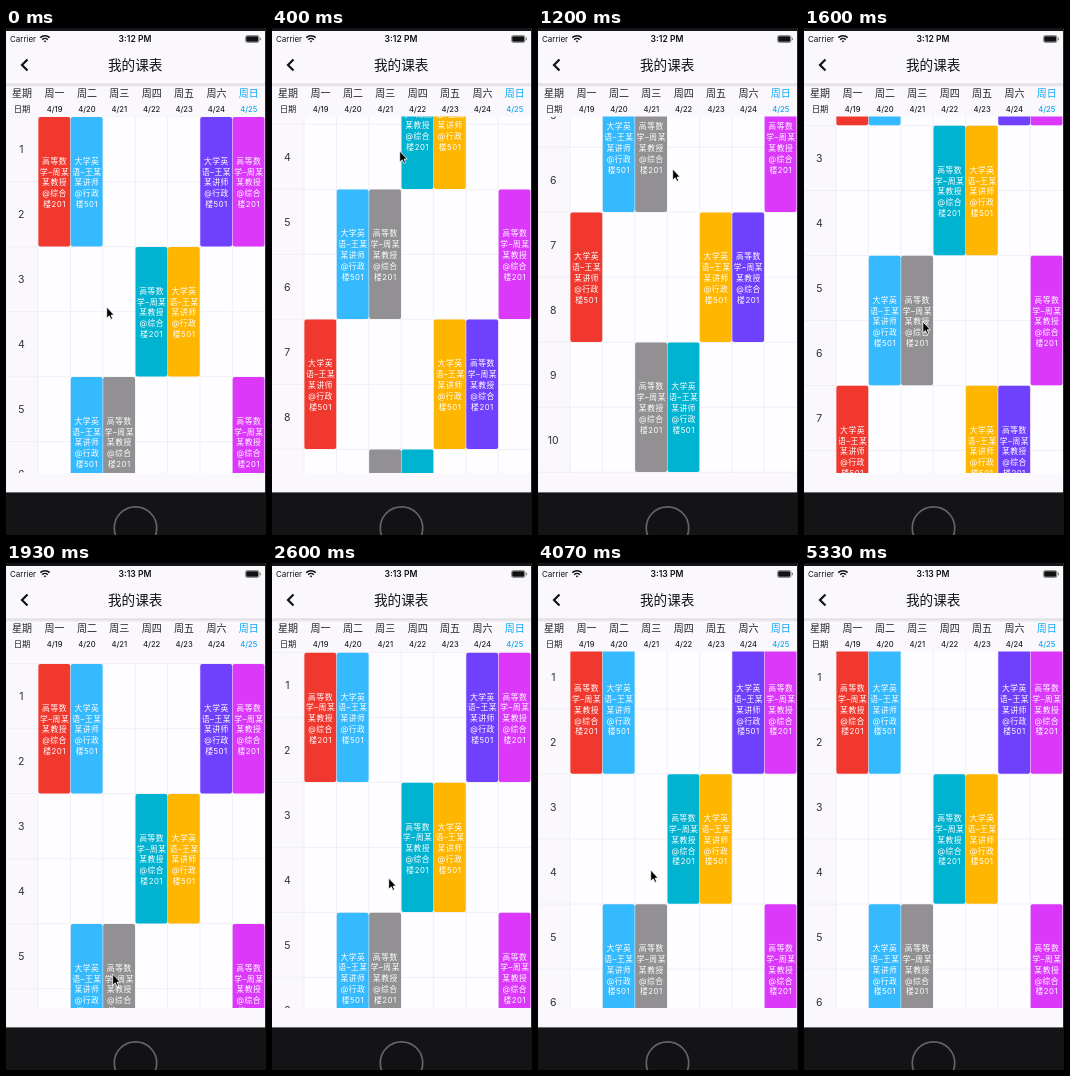
These frames come from a looping animation (260x507 px, 5390 ms). An HTML page:

```html
<!DOCTYPE html>
<html lang="zh">
<head>
<meta charset="utf-8">
<style>
html, body { margin: 0; width: 100%; height: 100%; overflow: hidden; background: #faf8fc; }
svg { display: block; width: 260px; height: 507px; font-family: Inter, "Noto Sans CJK SC", "Noto Sans CJK", sans-serif; }
</style>
</head>
<body>
<svg viewBox="0 0 260 507">
  <defs>
    <clipPath id="view"><rect y="88.5" width="259" height="356.5"/></clipPath>
    <linearGradient id="shade" x2="0" y2="1">
      <stop stop-color="#d9d7dc"/><stop offset="1" stop-color="#faf8fc"/>
    </linearGradient>
  </defs>
  <rect width="260" height="507" fill="#faf8fc"/>
  <g clip-path="url(#view)"><g id="grid"></g></g>
  <g id="head">
    <rect y="55.5" width="259" height="4" fill="url(#shade)"/>
    <path d="M21.5 31.5L16 37l5.5 5.5" fill="none" stroke="#111" stroke-width="2.2"/>
    <g fill="none" stroke="#111" stroke-width="1.5">
      <path d="M34.3 9.6a6.6 6.6 0 0 1 9.4 0M36.2 11.7a4 4 0 0 1 5.6 0"/>
      <path d="M39 14.6l-1.3-1.5a2 2 0 0 1 2.6 0z" fill="#111" stroke="none"/>
    </g>
    <rect x="239.5" y="7.5" width="13.5" height="7" rx="1.8" fill="none" stroke="#666" stroke-width=".7"/>
    <rect x="240.2" y="8.2" width="12.1" height="5.6" rx="1.2" fill="#111"/>
    <path d="M254.4 9.8v2.4" stroke="#777"/>
  </g>
  <rect width="260" height="3" fill="#16151a"/>
  <rect x="259" width="1" height="507" fill="#29282c"/>
  <rect y="464.4" width="260" height="43" fill="#141416"/>
  <circle cx="129.5" cy="500" r="21.2" fill="#121214" stroke="#656568" stroke-width="1.7"/>
  <path id="cursor" d="M0 0V11.2L2.6 8.8L4.2 12.4L5.9 11.7L4.4 8.1H7.5Z" fill="#000" stroke="#fff" stroke-width=".8"/>
</svg>
<script>
const $ = id => document.getElementById(id);
const grid = $('grid'), head = $('head'), cursor = $('cursor');
const TOP = 89, ROW = 65, COL = 259 / 8;
const LOOP = 5390, FRAMES = 81;

function add(parent, tag, attrs, content = '') {
  const el = document.createElementNS('http://www.w3.org/2000/svg', tag);
  for (const k in attrs) el.setAttribute(k, attrs[k]);
  el.textContent = content;
  return parent.appendChild(el);
}

// Text centred on (x, y)
const label = (parent, str, x, y, size, fill = '#222', more = {}) =>
  add(parent, 'text', { x, y: y + size * 0.37, 'font-size': size, fill, 'text-anchor': 'middle', ...more }, str);

// Header
label(head, 'Carrier', 17, 11, 8, '#111');
const clock = label(head, '', 129, 11, 8.6, '#111', { 'font-weight': 600 });
label(head, '我的课表', 129.2, 37, 13.6, '#111', { 'font-weight': 500 });
label(head, '星期', 16, 65, 10);
label(head, '日期', 16, 81, 8.4);
[...'一二三四五六日'].forEach((day, i) => {
  const x = COL * (i + 1.5), fill = i == 6 ? '#0ca6f5' : '#222';
  label(head, '周' + day, x, 65, 10, fill);
  label(head, '4/' + (19 + i), x, 80.8, 7.6, fill, { 'font-weight': 500 });
});

// Timetable
add(grid, 'rect', { x: COL, y: TOP, width: COL * 7, height: ROW * 10, fill: '#fefdff' });
let lines = '';
for (let r = 0; r <= 10; r++) lines += `M0 ${TOP + r * ROW - 0.3}H259`;
for (let c = 1; c < 8; c++) lines += `M${c * COL - 0.3} ${TOP}v${ROW * 10}`;
add(grid, 'path', { d: lines, stroke: '#eeecf1', 'stroke-width': 0.8 });
for (let r = 0; r < 10; r++) label(grid, r + 1, 15.3, TOP + ROW * (r + 0.5), 10.5, '#333');

// One string per pair of rows: the letter is the colour, upper case is maths, lower case English
const PLAN = ['Rb...vP', '...Ca..', '.bG...P', 'r...aV.', '..Gc...'];
const COLORS = { r: '#f0382e', b: '#35b9ff', g: '#929092', c: '#00b3d0', a: '#ffb600', v: '#7040ff', p: '#db38fb' };
const MATH = ['高等数', '学–周某', '某教授', '@综合', '楼201'];
const ENGLISH = ['大学英', '语–王某', '某讲师', '@行政', '楼501'];
PLAN.forEach((week, row) => [...week].forEach((key, day) => {
  if (key == '.') return;
  const color = key.toLowerCase(), x = COL * (day + 1), y = TOP + row * 2 * ROW;
  add(grid, 'rect', { x, y, width: COL - 0.5, height: ROW * 2 - 0.6, rx: 2, fill: COLORS[color] });
  (key == color ? ENGLISH : MATH).forEach((s, i) =>
    label(grid, s, x + COL / 2, y + ROW + 0.6 + (i - 2) * 10.8, 7.8, '#fff', { 'letter-spacing': 0.5 }));
}));

// Motion: each move adds its distance between two times
const smooth = u => u * u * (3 - 2 * u);
const fling = u => 1 - (1 - u) ** 2.5;
const progress = (t, from, to, ease = smooth) =>
  ease(Math.min(1, Math.max(0, (t - from) / (to - from))));

const scrolls = [
  [0, 1200, 294.5, fling], [1200, 1930, -306.5], [1930, 2600, 11.3, fling],
  [2600, 3270, -0.3], [3600, 4070, 8.7]
];
const strokes = [
  [0, 330, 27, -156], [730, 1200, 7, 18], [1200, 1930, -28, 270], [2070, 2500, 10, -96],
  [2700, 3200, -4, 0], [3600, 4070, 0, -8], [4270, 4400, -9, -38], [4530, 4730, -14, -183]
];

function draw(now) {
  const frame = Math.floor(now % LOOP / LOOP * FRAMES + 0.1) % FRAMES;
  const t = frame * LOOP / FRAMES;
  let offset = 0, x = 100.7, y = 279;
  for (const [from, to, d, ease] of scrolls) offset += d * progress(t, from, to, ease);
  for (const [from, to, dx, dy] of strokes) {
    const p = progress(t, from, to);
    x += dx * p;
    y += dy * p;
  }
  grid.setAttribute('transform', `translate(0 ${-offset})`);
  cursor.setAttribute('transform', `translate(${x} ${y})`);
  cursor.setAttribute('visibility', t < 4780 ? 'visible' : 'hidden');
  clock.textContent = t < 1850 ? '3:12 PM' : '3:13 PM';
}

let start;
function tick(now) {
  start ??= now;
  draw(now - start);
  requestAnimationFrame(tick);
}
draw(0);
requestAnimationFrame(tick);
</script>
</body>
</html>
```
